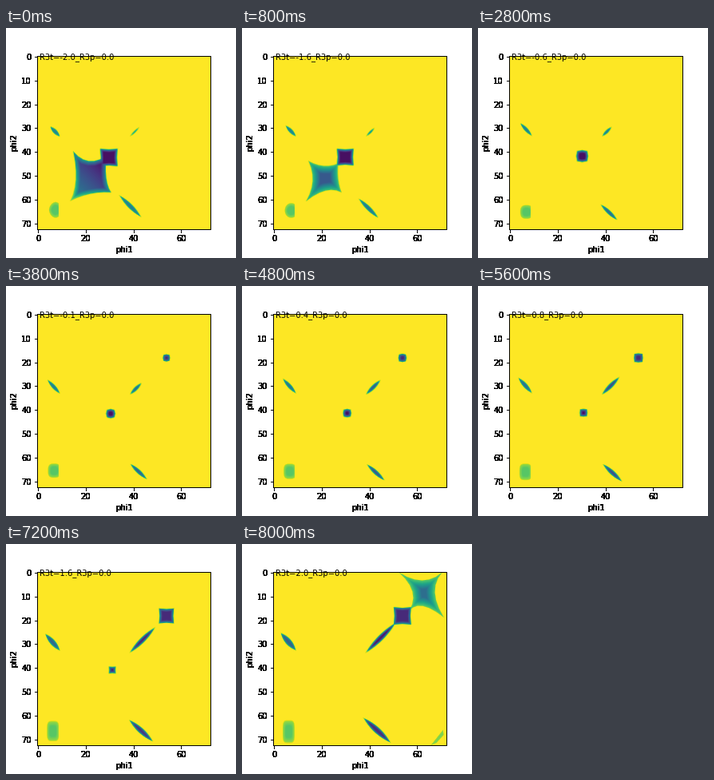
These frames come from a looping animation (288 px wide and 288 px high, 8200 ms). A matplotlib script:

```python
import matplotlib.pyplot as plt
import numpy as np
from matplotlib.animation import FuncAnimation
from matplotlib.path import Path

N = 219                      # samples per side, about one per pixel
LEFT, TOP, SIDE = 38.88, 34.56, 217.44
FRAMES, INTERVAL = 41, 200

centres = (np.arange(N) + 0.5) * SIDE / N
X, Y = np.meshgrid(LEFT + centres, TOP + centres)
POINTS = np.column_stack([X.ravel(), Y.ravel()])

# Shapes are in stage pixels. Each streak is x0, y0, x1, y1, half width and
# core level, as rows of constant, linear and quadratic factors of t.
STREAKS = [
    np.array([(52, 118, 67, 134.5, 2.2, .38),
              (-1.7, -3, 0, -.7, .3, -.03),
              (0, 0, 0, 0, .2, 0)]),
    np.array([(155.5, 135.5, 169.5, 121.5, 2.1, .28),
              (-.2, .2, 6.5, -6.5, .6, -.1),
              (0, 0, 2.3, -2.3, 0, 0)]),
    np.array([(156, 223.5, 176, 242, 2.4, .28),
              (2.5, 2, 4.2, 3, .25, -.07),
              (-2.2, -2.3, .2, .1, .2, 0)]),
]

# Stars: a tip, the middle of the side after it, the next tip, and so on.
STAR_BIG = np.array([(84, 155), (103, 167), (125, 161), (125, 188),
                     (131, 206), (105, 208), (80, 217), (87, 190)])
STAR_SMALL = np.array([(83, 167), (102, 173), (120, 170), (120, 189),
                       (124, 206), (104, 204), (80, 217), (88, 192)])
STAR_TOP = np.array([(196, 36), (225, 46), (250, 36), (241, 61),
                     (252, 92), (226, 78), (209, 84), (213, 60)])
WEDGE = np.array([(251, 233), (252, 239), (243, 249), (236, 252)])


def streak(x0, y0, x1, y1, w):
    """Depth inside a pointed lens."""
    dx, dy = x1 - x0, y1 - y0
    length = np.hypot(dx, dy)
    mx, my = X - (x0 + x1) / 2, Y - (y0 + y1) / 2
    s = 2 * (mx * dx + my * dy) / length**2
    return w * (1 - s**2) - abs(mx * dy - my * dx) / length


def square(cx, cy, h, pinch):
    """Depth inside a square whose corners stick out or are cut."""
    ax, ay = abs(X - cx), abs(Y - cy)
    return h - np.maximum(ax, ay) + pinch * np.minimum(ax, ay)


def oval(cx, cy, rx, ry, power):
    """Depth inside a superellipse."""
    r = (abs((X - cx) / rx)**power + abs((Y - cy) / ry)**power)**(1 / power)
    return (1 - r) * min(rx, ry)


def polygon(verts):
    """Signed distance to a polygon, positive inside."""
    dist = np.full(len(POINTS), np.inf)
    for a, b in zip(verts, np.roll(verts, -1, axis=0)):
        ab, ap = b - a, POINTS - a
        u = np.clip(ap @ ab / (ab @ ab), 0, 1)
        dist = np.minimum(dist, np.hypot(*(ap - u[:, None] * ab).T))
    inside = Path(verts).contains_points(POINTS)
    return np.where(inside, dist, -dist).reshape(N, N)


def star(knots):
    """Polygon depth with a curve from tip to tip through each middle."""
    tips, mids = knots[::2], knots[1::2]
    u = np.linspace(0, 1, 6, endpoint=False)[:, None]
    sides = [a * (1 - u) * (1 - 2 * u) + 4 * m * u * (1 - u) + b * u * (2 * u - 1)
             for a, m, b in zip(tips, mids, np.roll(tips, -1, axis=0))]
    return polygon(np.concatenate(sides))


def level(depth, edge, core, soft):
    """Shade from edge to core with a one pixel rim; 1 outside."""
    shade = edge + (core - edge) * np.clip(depth / soft, 0, 1)
    return 1 - (1 - shade) * np.clip(depth + .5, 0, 1)


def field(t):
    layers = []
    for factors in STREAKS:
        *lens, core = np.array([1, t, t * t]) @ factors
        layers.append(level(streak(*lens), .58, core, 2.2))

    pinch = min(.08, -.25 + .2 * t * t)
    h = np.interp(t, (-2, -1.1, -.1, 1.6, 1.9), (10, 9, 5.7, 3.8, -1))
    middle = square(130.8 + 1.2 * t, 160 - 1.2 * t, h, pinch)
    layers.append(level(middle, .52, .04, 3.5))
    h = np.interp(t, (-.7, -.1, .8, 2), (-1, 4.5, 5.6, 10))
    layers.append(level(square(200.5, 90.3, h, pinch), .52, .12, 3.5))

    patch = oval(60 - .9 * t, 231.5 + 1.8 * t, 7.7 - .2 * t,
                 8.8 + t + .75 * t * t, 3 + .6 * t)
    layers.append(np.where(X < 65.8, level(patch, .86, .74, 3.5), 1))

    if t < -.75:
        k = np.interp(t, (-2, -1.6), (0, 1))
        fade = np.interp(t, (-1.6, -1.1), (0, 1))
        inset = np.interp(t, (-1.6, -1.1, -.8), (0, 9, 16))
        depth = star(STAR_BIG + k * (STAR_SMALL - STAR_BIG)) - inset
        edge, core = .6 + .12 * k + .14 * fade, .22 + .06 * k + .37 * fade
        tilt = .005 * (1 - k) * (X - 104 - Y + 186)
        layers.append(level(depth, edge - tilt, core - tilt, 6 + 4 * k))
    if t > 1.65:
        k = np.interp(t, (1.6, 2), (0, 1))
        depth = star(STAR_TOP) - 15 * (1 - k)
        layers.append(level(depth, .86 - .1 * k, .7 - .34 * k, 11))
        layers.append(level(polygon(WEDGE) - 8 * (1 - k), .83, .78, 3))
    return np.clip(np.min(layers, axis=0), 0, 1)


plt.rcParams["font.family"] = "DejaVu Sans"
fig = plt.figure(figsize=(4, 4), dpi=72)
fig.subplots_adjust(left=.125, right=.9, bottom=.125, top=.88)

# Stacked frames make the axis lettering heavy.
for i in range(16):
    ax = fig.add_subplot(label=str(i))
    ax.set(xlim=(-.5, 72.5), ylim=(72.5, -.5), aspect="equal",
           xlabel="phi1", ylabel="phi2")
    ax.patch.set_visible(False)

base = fig.axes[0]
image = base.imshow(field(-2), vmin=0, vmax=1, cmap="viridis",
                    extent=(-.5, 72.5, 72.5, -.5))
label = base.text(.6, 1, "")


def update(i):
    t = (i - 20) / 10
    image.set_data(field(t))
    label.set_text(f"R3t={t:.1f}_R3p=0.0")
    return image, label


anim = FuncAnimation(fig, update, frames=FRAMES, interval=INTERVAL, repeat=True)
plt.show()
```
